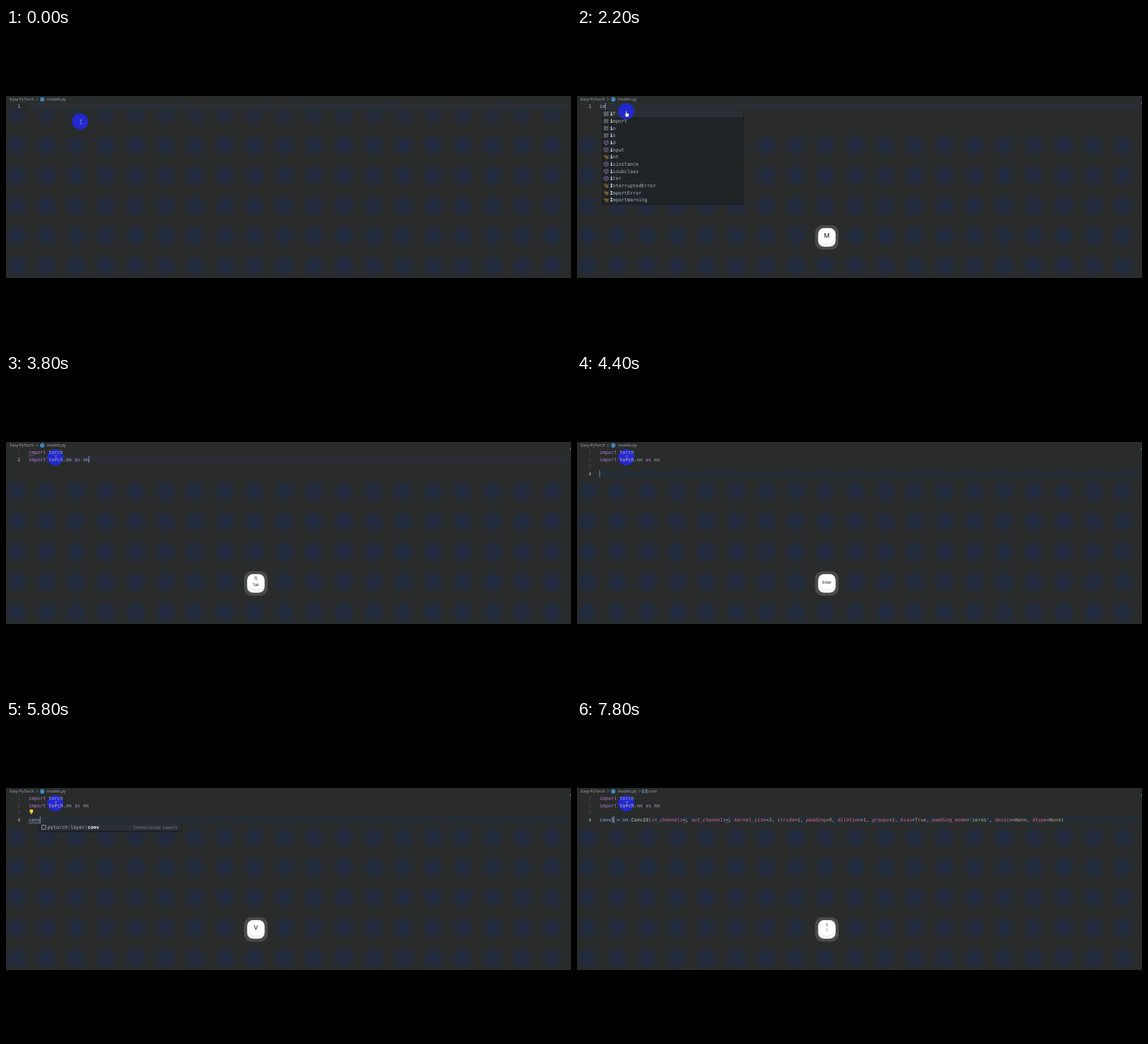
Write an HTML page that moves like this. It is 998 px wide and 561 px high and loops after 8 s.

```html
<!DOCTYPE html>
<html lang="en">
<head>
<meta charset="utf-8">
<title>Editor snippets</title>
<style>
html, body { margin: 0; width: 100%; height: 100%; overflow: hidden; background: #000; }
svg { display: block; width: 100%; height: 100%; }
text { white-space: pre; text-rendering: geometricPrecision; }
.mono { font-family: "DejaVu Sans Mono", monospace; font-size: 8.428px; }
.ui { font: 7.05px "Open Sans", sans-serif; fill: #a9adb1; }
.key { font-family: Roboto, sans-serif; text-anchor: middle; fill: #18181a; }
.detail { font-size: 7.15px; text-anchor: end; fill: #85898d; }
.w { fill: #abb2bf; }
.p { fill: #b77bd0; }
.y { fill: #dcc894; }
.i { fill: #df6b76; font-style: italic; }
.n { fill: #d19a66; }
.g { fill: #a9c58b; }
.b { fill: #fff; font-weight: bold; }
.line { fill: none; stroke-width: .8; }
</style>
</head>
<body>
<svg viewBox="0 0 998 561">
  <defs>
    <radialGradient id="blob">
      <stop offset="0" stop-color="#202a42"/>
      <stop offset=".45" stop-color="#212a3f" stop-opacity=".85"/>
      <stop offset="1" stop-color="#262b33" stop-opacity="0"/>
    </radialGradient>
    <pattern id="blobs" x="-7.6" y="180.4" width="52.55" height="53.2" patternUnits="userSpaceOnUse">
      <circle cx="26.2" cy="26.6" r="24" fill="url(#blob)"/>
    </pattern>
  </defs>
  <rect width="998" height="561"/>
  <rect y="120" width="998" height="321" fill="#292c2b"/>
  <rect y="180" width="998" height="261" fill="url(#blobs)"/>
  <path d="M0 120.5H998M0 440.5H998" stroke="#24343a"/>
  <g id="scene"></g>
</svg>
<script>
const LOOP = 8000, STEP = 200, CHAR = 5.074, LEFT = 40, ROW = 12.65;
const scene = document.getElementById('scene');
const lineY = n => 138 + ROW * n;
const rect = (x, y, w, h, fill, r = 0) =>
  `<rect x="${x}" y="${y}" width="${w}" height="${h}" rx="${r}" fill="${fill}"/>`;
const text = (x, y, cls, body, extra = '') => `<text x="${x}" y="${y}" class="${cls}" ${extra}>${body}</text>`;
const path = (d, color, extra = '') => `<path class="line" d="${d}" stroke="${color}" ${extra}/>`;

// The first letter of each run is its colour class.
const runs = source => source.split('|')
  .map(run => `<tspan class="${run[0]}">${run.slice(1)}</tspan>`).join('');
const plainLength = source => source.split('|').reduce((sum, run) => sum + run.length - 1, 0);

const args = [['in_channels', ''], ['out_channels', ''], ['kernel_size', 'n3'], ['stride', 'n1'],
  ['padding', 'n0'], ['dilation', 'n1'], ['groups', 'n1'], ['bias', 'nTrue'],
  ['padding_mode', "g'zeros'"], ['device', 'nNone'], ['dtype', 'nNone']]
  .map(([name, value]) => `i${name}|w=` + (value && '|' + value)).join('|w, |');
const layer = name => `w${name} = |wnn.|yConv2d|w(|${args}|w)`;

// Suggestions: icon letter, label with matched parts in stars, then a detail.
const letterI = ['k*i*f', 'k*i*mport', 'k*i*n', 'k*i*s', 'o*i*d', 'o*i*nput', 'c*i*nt', 'o*i*sinstance',
  'o*i*ssubclass', 'o*i*ter', 'c*I*nterruptedError', 'c*I*mportError', 'c*I*mportWarning'];
const importList = typed => {
  const rest = 'import'.slice(typed.length), upper = 'I' + typed.slice(1);
  return [`k*${typed}*${rest}`, `c*${upper}*${rest}Error`, `c*${upper}*${rest}Warning`,
    `o__*${typed}*${rest}__`, `spytorch:*${typed}*${rest}s/PyTorch Imports`];
};
const startsCo = ['k*co*ntinue', 'o*co*mpile', 'c*co*mplex', 'o*co*pyright', 'c*Co*nnectionAbortedError',
  'c*Co*nnectionError', 'c*Co*nnectionRefusedError', 'c*Co*nnectionResetError',
  'spytorch:*co*ntainer/Containers', 'c*C*hildPr*o*cessError', 'c*c*lassmeth*o*d',
  'spytorch:layer:*co*nv/Convolution Layers'];
const startsCon = startsCo.filter(item => /co\*n|Co\*n/.test(item))
  .map(item => item.replace(/(co)\*n/i, '$1n*'));

const torch = 'pimport|w torch';
const withAlias = [torch, 'pimport|w torch.nn |pas|w nn'];
const resolved = [torch, 'pimport|y torch|w.nn |pas|w nn'];
const fourth = source => [...resolved, 'w', source];
const typing = (t, word, keys, list, at = word.length) =>
  ({ t, lines: ['w' + word], keys, popup: { list, at } });

const states = [
  { t: 0, lines: ['w'], idle: true },
  typing(2000, 'i', ['I'], letterI),
  typing(2200, 'im', ['M'], letterI, 1),
  typing(2400, 'impo', ['O'], importList('impo')),
  typing(2600, 'impor', ['R'], importList('impor')),
  { t: 2800, lines: ['pimport'], keys: ['T'], popup: { list: importList('import'), at: 6 }, error: true },
  { t: 3000, lines: ['pimport'], keys: ['S'], popup: { list: importList('import'), at: 6 }, error: true },
  { t: 3200, lines: ['wimports'], keys: ['S'], error: true,
    popup: { list: ['spytorch:*imports*/PyTorch Imports'], at: 7 } },
  { t: 3600, lines: withAlias, keys: ['Tab'], error: true },
  { t: 4000, lines: withAlias, keys: ['Tab'] },
  { t: 4200, lines: [...resolved, 'w'], keys: ['Enter'] },
  { t: 4400, lines: fourth('w'), keys: ['Enter'] },
  { t: 4800, lines: fourth('wc'), keys: ['C'] },
  { t: 5000, lines: fourth('wco'), keys: ['C', 'O'], popup: { list: startsCo, at: 2 } },
  { t: 5400, lines: fourth('wcon'), keys: ['N'], popup: { list: startsCon, at: 3 } },
  { t: 5800, lines: fourth('wconv'), keys: ['V'], bulb: true,
    popup: { list: ['spytorch:layer:*conv*/Convolution Layers'], at: 4 } },
  { t: 6800, lines: fourth(layer('conv')), keys: ['Tab'], caret: 4, slots: true },
  { t: 7600, lines: fourth(layer('conv1')), keys: ['1'], caret: 5, slots: true, crumb: true }
];

function icon(kind, x, y) {
  const at = `transform="translate(${x} ${y})"`;
  return {
    k: path('M-4-3H0M1.5-3H4M-4-1H4M-4 1H0M1.5 1H4M-4 3H3', '#b5b8bb', at),
    o: path('M0-4L3.6-2V2L0 4L-3.6 2V-2ZM-3.6-2L0 0L3.6-2M0 0V4', '#a883c9', at),
    c: path('M-4-1.5L-2-3.5L0-1.5L-2 .5ZM-1-.5H2M-1-.5V2.5H2M1.5-.5L3-2L4-.8L2.8 .5ZM1.5 2.5L3 1L4 2.2L2.8 3.5Z',
      '#dc9a38', at),
    s: path('M-3.5-3.7H3.5V3.5H-3.5Z', '#c0c4c8', at)
  }[kind];
}

function popupParts({ list, at }, row) {
  const x = LEFT + at * CHAR + .4, top = lineY(row) + 7.4, height = list.length * 12.68;
  const box = rect(x - 1, top - .3, 250, height + 1.8, '#181c1f') + rect(x, top, 248, height + .5, '#1f2427') +
    rect(x, top, 248, 11.6, '#2c2f36');
  const items = list.map((item, i) => {
    const [label, detail] = item.slice(1).split('/'), y = top + 5.9 + i * 12.68;
    const parts = label.split('*').map((part, j) => (j % 2 ? 'b' : 'w') + part).join('|');
    return icon(item[0], x + 6, y) + text(x + 12.8, y + 2.9, 'mono', runs(parts)) +
      (detail ? text(x + 242.3, y + 2.6, 'mono detail', detail) : '');
  }).join('');
  return [box, items];
}

function squiggle(x, width, y, color) {
  let d = `M${x} ${y}`;
  for (let i = 1; i * 1.6 <= width; i++) d += `L${x + i * 1.6} ${y + (i % 2 ? 1.4 : 0)}`;
  return path(d, color);
}

function keycaps(keys) {
  const width = 36 * keys.length + 5.5, left = 441.3 - width / 2;
  return rect(left, 348, width, 43, '#4b4b49', 13) + keys.map((key, i) => {
    const x = left + 5.3 + 36 * i, mid = x + 15.5;
    const label = (y, size, body) => text(mid, y, 'key', body, `font-size="${size}"`);
    const face = key === 'Tab'
      ? path(`M${mid + 2.5} 358.5H${mid - 2.5}l1.2-1.2M${mid - 2.5} 361.5H${mid + 2.5}l-1.2 1.2`, '#222') +
        label(374, 6.6, key)
      : key === 'Enter' ? label(370, 7, key)
      : key === '1' ? label(364, 7.2, '1') + label(372.5, 7.2, '!')
      : label(370, 11.5, key);
    return rect(x, 353, 31, 33, '#e5e5e9', 10.5) + rect(x + .5, 353, 30, 31, '#fafafb', 10.5) +
      rect(x + 2.5, 354, 26, 26, '#fff', 9) +
      path(`M${x + 3} 374q2 7 9 7h7q7 0 9-7`, '#dddde2') + face;
  }).join('');
}

function breadcrumb(more) {
  const chevron = x => path(`M${x} 123.2l2.4 2.5l-2.4 2.5`, '#a0a4a8');
  return text(6.6, 128.4, 'ui', 'Easy-PyTorch') + chevron(53.3) +
    '<circle cx="64" cy="126" r="3.9" fill="#3c86b8"/>' + text(71.8, 128.4, 'ui', 'models.py') +
    (more ? chevron(109.5) + path('M117.4 122.8H115.6V128.8H117.4M121.8 122.8H123.6V128.8H121.8', '#a9b4c0') +
      path('M119.6 123.6L122 125L121.4 127.4L119.4 128L117.3 126.8L117.6 124.6Z', '#68a9de') +
      text(125.7, 128.4, 'ui', 'conv') : '');
}

function pointer(x, y, hand) {
  return hand
    ? `<path transform="translate(${x + 1} ${y + 5})" fill="#fff" stroke="#222" stroke-width=".4"
        d="M-2-5q1-1 1.6 .2V-2l3 .7q1.6 .4 1.3 2.2L3 4.8H-1.2L-4 1q-.2-1.4 1-.8l1 .8Z"/>`
    : path(`M${x - 1} ${y - 3}h1.6l.5 .5l.5-.5h1.6M${x + 1.1} ${y - 2.5}v6M${x - 1} ${y + 4}h1.6l.5-.5l.5 .5h1.6`,
        '#a3a6ad');
}

function draw(t) {
  const s = states.findLast(state => state.t <= t);
  const row = s.lines.length - 1, y = lineY(row);
  const go = Math.min(1, Math.max(0, (t - 400) / 1000)), ease = go * go * (3 - 2 * go);
  const mx = 131 - 44 * ease, my = 165 - 18 * ease;
  const halo = `<circle cx="${mx}" cy="${my}" r="14.2" fill="#2328cf"/>`;
  const [box, items] = s.popup ? popupParts(s.popup, row) : ['', ''];
  const haloOnTop = s.popup?.at === 1;
  const caret = LEFT + (s.caret ?? plainLength(s.lines[row])) * CHAR;
  let out = '';

  if (s.idle) for (let i = 0; i < 19; i++)
    out += `<circle cx="${18.6 + i * 52.55}" cy="154" r="22" fill="url(#blob)" opacity=".8"/>`;
  out += rect(LEFT, y - 6.2, 953, 12.3, row > 1 ? '#252d35' : '#2b2f35');
  if (s.slots) {
    const shift = s.caret - 4;
    for (const col of [28, 43])
      out += rect(LEFT + (col + shift) * CHAR + 4, y - 5, 3, 10, '#394047') +
        squiggle(LEFT + (col + shift) * CHAR, 6, y + 4.5, '#d34f55');
    if (shift) out += rect(61, y - 6, 5, 12, '#45474e');
  }
  out += haloOnTop ? '' : halo;

  s.lines.forEach((line, i) => {
    const base = lineY(i) + 2.9;
    out += text(25.3, base, 'mono', i + 1, `text-anchor="end" fill="${i === row ? '#b2b6bc' : '#495057'}"`) +
      text(LEFT, base, 'mono', runs(line));
  });
  if (s.error) out += squiggle(LEFT, 11, 143.3, '#c4627c');
  if (s.bulb) out += squiggle(LEFT, 21, y + 5, '#a9b6c4') +
    '<circle cx="44.8" cy="160.6" r="3.2" fill="#f5c931"/>' +
    rect(43.4, 162.8, 2.8, 1.6, '#f5c931') + rect(43.5, 164.6, 2.6, 1.3, '#c9ccd0');
  if (!s.idle) out += rect(caret - .4, y - 6, 1, 12, '#7fa3dc') + rect(996, 131.5, 2, 2, '#70767c');

  out += box + (haloOnTop ? halo : '') + items + breadcrumb(s.crumb) + (s.keys ? keycaps(s.keys) : '');
  scene.innerHTML = out + pointer(mx, my, s.popup && row === 0);
}

let shown = -1;
function tick() {
  const step = Math.floor(performance.now() % LOOP / STEP);
  if (step !== shown) draw((shown = step) * STEP);
  requestAnimationFrame(tick);
}
tick();
</script>
</body>
</html>
```
